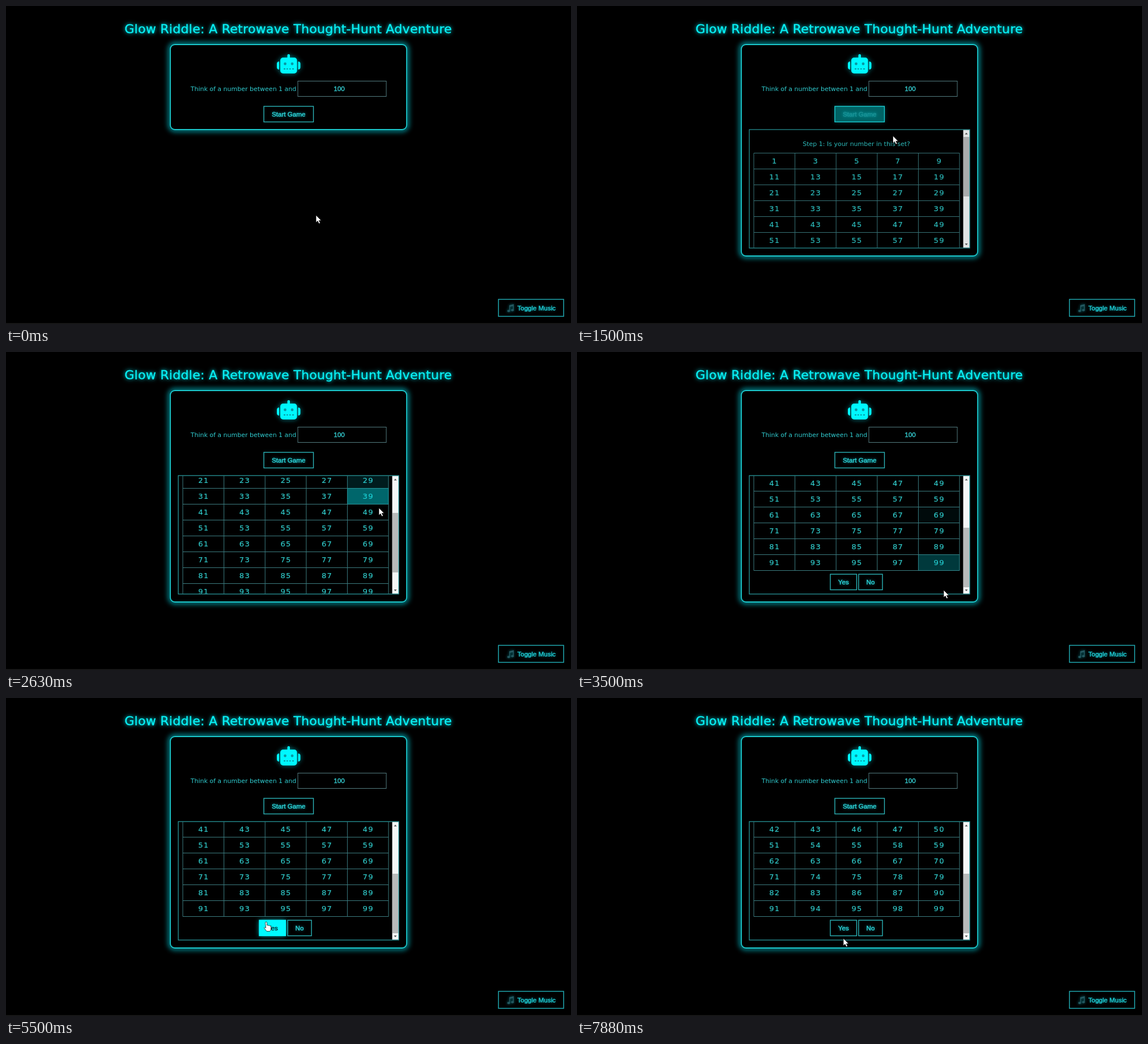
An HTML page that plays this animation: 997 px wide and 561 px high, repeating every 8 s.

```html
<!DOCTYPE html>
<html lang="en">
<head>
<meta charset="utf-8">
<title>Mind game</title>
<style>
  html, body { margin: 0; height: 100%; overflow: hidden; background: #000; }
  svg { display: block; width: 100vw; height: 100vh; }
  text { text-anchor: middle; font: 11px "DejaVu Sans", sans-serif; }
  #title { font-size: 22px; letter-spacing: .3px; }
  .ui { font: 11.6px "Liberation Sans", Arial, sans-serif; stroke-width: .4; }
  .num { font-size: 13px; letter-spacing: 1.3px; }
</style>
</head>
<body>
<svg viewBox="0 0 997 561">
  <defs>
    <filter id="blur" filterUnits="userSpaceOnUse" x="0" y="0" width="997" height="700"><feGaussianBlur stdDeviation="4.5"/></filter>
    <filter id="soft" filterUnits="userSpaceOnUse" x="0" y="0" width="997" height="700"><feGaussianBlur stdDeviation="2.5"/></filter>
    <clipPath id="view"><rect x="304.5" y="218.5" width="377" height="208"/></clipPath>
    <text id="title" x="498" y="48">Glow Riddle: A Retrowave Thought-Hunt Adventure</text>
    <g id="robot">
      <rect x="484" y="91" width="29.500" height="28" rx="5"/>
      <rect x="496.500" y="85" width="4.500" height="9" rx="2"/>
      <path d="M482 98v14q-4 0-4-4v-6q0-4 4-4zM515.500 98v14q4 0 4-4v-6q0-4-4-4z"/>
    </g>
    <g id="music">
      <path d="M888 528l8-2v10.500h-1.500v-7l-5 1.300v7.200h-1.500z"/>
      <ellipse cx="887" cy="538" rx="2.600" ry="2"/><ellipse cx="893.700" cy="536.600" rx="2.600" ry="2"/>
    </g>
  </defs>

  <rect width="997" height="561"/>
  <rect y="559.5" width="997" height="1.5" fill="#1c1c1c"/>
  <use href="#title" fill="#00a4ac" filter="url(#blur)"/>
  <use href="#title" fill="#009098" filter="url(#soft)"/>
  <use href="#title" fill="#08f0f4" stroke="#08f0f4" stroke-width=".4"/>

  <rect class="card" x="290" y="68" width="417" rx="8" fill="none" stroke="#007c84" stroke-width="9" filter="url(#blur)"/>
  <rect class="card" x="290" y="68" width="417" rx="8" stroke="#1cc8cc" stroke-width="1.8"/>

  <use href="#robot" fill="#008890" filter="url(#blur)"/>
  <use href="#robot" fill="#00f8ff"/>
  <g fill="#0899a4">
    <circle cx="492.5" cy="102" r="2.4"/><circle cx="505" cy="102" r="2.4"/>
    <path d="M490 110h3v2h-3zM495 110h2.500v2h-2.500zM500 110h2.500v2h-2.500zM505 110h3v2h-3z"/>
  </g>

  <text x="419" y="150" fill="#30ccd0">Think of a number between 1 and</text>
  <rect x="515" y="132.500" width="156" height="27" fill="none" stroke="#547c80"/>
  <text class="ui" x="588" y="149.500" fill="#34ccd0" stroke="#34ccd0">100</text>
  <g id="start"></g>

  <rect x="869" y="517.500" width="115" height="30" fill="none" stroke="#20a8b0" stroke-width="1.500"/>
  <use href="#music" fill="#087078" filter="url(#soft)"/>
  <use href="#music" fill="#245860"/>
  <text class="ui" x="936" y="537" fill="#008890" filter="url(#soft)">Toggle Music</text>
  <text class="ui" x="936" y="537" fill="#20d0d8" stroke="#20d0d8">Toggle Music</text>

  <g id="panel">
    <g clip-path="url(#view)">
      <g id="content">
        <text id="step" x="493" y="246.500" fill="#30c8c8"></text>
        <g id="grid"></g>
        <g id="numbers" fill="#30c8c8" stroke="#30c8c8" stroke-width=".2"></g>
        <g id="tints" fill="#00d8e4"></g>
        <g id="answers"></g>
      </g>
    </g>
    <rect x="681.500" y="218.500" width="11.500" height="208" fill="#f4f6f6"/>
    <rect id="thumb" x="682" y="231" width="10.500" height="105" fill="#b8baba"/>
    <path d="M684.500 226.500l2.500-3 2.500 3zM684.500 419l2.500 3 2.500-3z" fill="#555"/>
    <rect x="304" y="218" width="389" height="209" fill="none" stroke="#2ca4a8" stroke-width="1.200"/>
  </g>

  <g id="cursor" fill="#fff" stroke="#000" stroke-width=".7">
    <path id="arrow" d="M0 0v13l3-2.700 2.200 4.700 2.300-1-2.200-4.600h4z"/>
    <path id="hand" d="M-1.500 1.500q0-1.500 1.500-1.500t1.500 1.500v4.500q1.500-.8 2.500.4 1.500-.6 2.300.5 2.200-.3 2.200 1.600v3.500q0 3-2 4.500h-5.500q-2-2.500-4.500-6 0-2 3 0z"/>
  </g>
</svg>
<script>
const LOOP = 8000, FADE = 300, ROW = 28, TOP = 259.5, COL = 72.6, LEFT = 312;
const CARD_GROWS = 880, NEXT_STEP = 5650;
const START_HOVER = [600, 1320], YES_HOVER = [5100, 6950];

// [time, x, y] of the pointer tip
const POINTER = [
  [150, 547, 369], [650, 497, 201], [1000, 494, 199], [1250, 494, 199], [1800, 640, 268],
  [2000, 643, 270], [2630, 658, 275], [3100, 655, 282], [3240, 653, 300], [3500, 647, 420],
  [3630, 650, 441], [4550, 650, 441], [5250, 459, 395], [6300, 459, 395], [6650, 462, 400],
  [6880, 462, 402], [7100, 468, 474], [7630, 470, 474], [7880, 470, 424]
];
// [time, offset]: three wheel ticks
const SCROLL = [[2200, 0], [2350, 52], [2440, 52], [2600, 103], [2780, 103], [2930, 154]];
// [row, enter, leave] for the last column
const CELL_HOVERS = [
  [0, 1940, 2250], [2, 2270, 2470], [3, 2490, 2640], [4, 2640, 2800],
  [6, 2850, 3215], [7, 3215, 3280], [8, 3280, 3340], [9, 3340, 3460]
];

const el = id => document.getElementById(id);
const clamp = v => Math.min(1, Math.max(0, v));
const ease = v => v * v * (3 - 2 * v);
const within = (t, [from, to]) => t >= from && t < to;

function track(keys, t) {
  const next = keys.findIndex(k => k[0] > t);
  if (next === 0) return keys[0].slice(1);
  if (next < 0) return keys[keys.length - 1].slice(1);
  const a = keys[next - 1], b = keys[next];
  const p = ease((t - a[0]) / (b[0] - a[0]));
  return a.slice(1).map((v, i) => v + (b[i + 1] - v) * p);
}

function hover(t, [enter, leave]) {
  const reached = clamp((Math.min(t, leave) - enter) / FADE);
  return clamp(reached - Math.max(0, t - leave) / FADE);
}

function button(label, x, y, width, height, id) {
  const box = `x="${x}" y="${y}" width="${width}" height="${height}"`;
  const text = (color, extra = '') =>
    `<text class="ui" x="${x + width / 2}" y="${y + height / 2 + 4}" fill="${color}" stroke="${color}" ${extra}>${label}</text>`;
  return `<rect ${box} stroke="#2cb4b8" stroke-width="1.400"/>
    ${text('#007880', 'filter="url(#soft)"')}${text('#30d8dc')}
    <g id="${id}" opacity="0"><rect ${box} fill="#00a8b0" filter="url(#blur)"/>
    <rect ${box} fill="#00faff" stroke="#00faff"/>${text('#042c30')}</g>`;
}

function build() {
  let lines = '';
  for (let r = 0; r <= 10; r++) lines += `M${LEFT} ${TOP + r * ROW}h${5 * COL}`;
  for (let c = 0; c <= 5; c++) lines += `M${LEFT + c * COL} ${TOP}v${10 * ROW}`;
  el('grid').innerHTML = `<path d="${lines}" fill="none" stroke="#3c7c80"/>`;
  el('tints').innerHTML = CELL_HOVERS.map(([row]) =>
    `<rect x="${LEFT + 4 * COL}" y="${TOP + row * ROW}" width="${COL}" height="${ROW}"/>`).join('');
  el('start').innerHTML = button('Start Game', 455, 177, 87.5, 27.5, 'startHot');
  el('answers').innerHTML =
    button('No', 497, 546, 42, 27.5, 'noHot') + button('Yes', 447, 546, 46.5, 27.5, 'yesHot');
}

let shownStep = 0;
function showStep(step) {
  if (step === shownStep) return;
  shownStep = step;
  el('step').textContent = `Step ${step}: Is your number in this set?`;
  const numbers = Array.from({ length: 100 }, (_, i) => i + 1).filter(n => n & step);
  el('numbers').innerHTML = numbers.map((n, i) => {
    const x = LEFT + (i % 5 + .5) * COL + .5, y = TOP + Math.floor(i / 5) * ROW + 18.5;
    return `<text class="num" x="${x}" y="${y}">${n}</text>`;
  }).join('');
}

function draw(t) {
  const cardHeight = t < CARD_GROWS ? 150 : 373;
  document.querySelectorAll('.card').forEach(c => c.setAttribute('height', cardHeight));
  el('panel').setAttribute('opacity', ease(clamp((t - 1000) / 600)));
  showStep(t < NEXT_STEP ? 1 : 2);

  const [offset] = track(SCROLL, t);
  el('content').setAttribute('transform', `translate(0 ${-offset})`);
  el('thumb').setAttribute('y', 231 + offset * .513);

  CELL_HOVERS.forEach(([, ...span], i) => el('tints').children[i].setAttribute('opacity', hover(t, span)));
  el('startHot').setAttribute('opacity', hover(t, START_HOVER));
  el('yesHot').setAttribute('opacity', hover(t, YES_HOVER));

  const pointing = within(t, START_HOVER) || within(t, YES_HOVER);
  el('hand').style.display = pointing ? '' : 'none';
  el('arrow').style.display = pointing ? 'none' : '';
  el('cursor').setAttribute('transform', `translate(${track(POINTER, t)})`);
}

build();
const began = performance.now();
function tick() {
  draw((performance.now() - began) % LOOP);
  requestAnimationFrame(tick);
}
tick();
</script>
</body>
</html>
```
